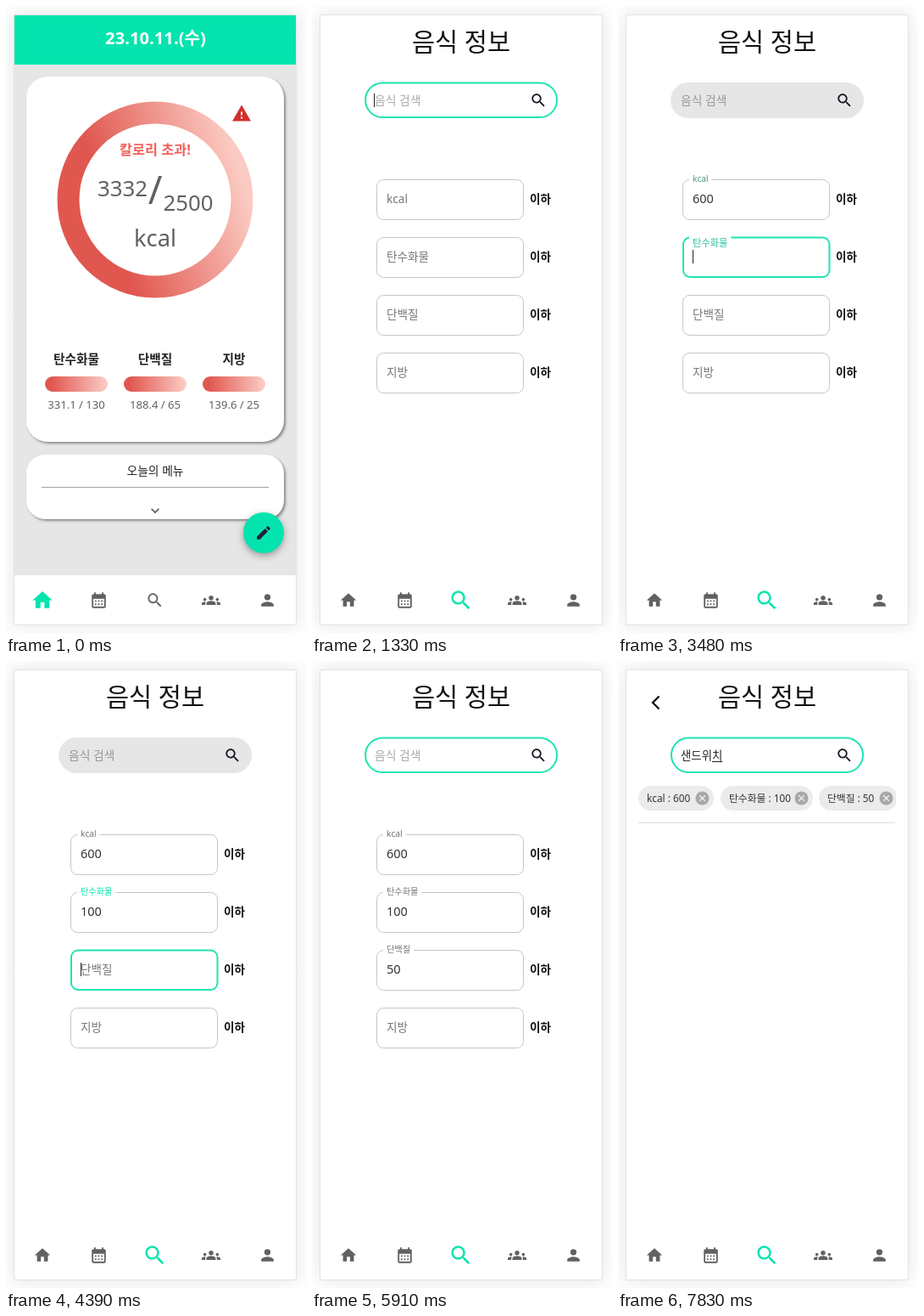
Recreate the animation shown at these times as an HTML page with a canvas. Size 354 by 738 pixels, loop 8 s.

```html
<!DOCTYPE html>
<html lang="ko">
<head>
<meta charset="utf-8">
<title>음식 정보</title>
<style>
  html, body { margin: 0; width: 100%; height: 100%; overflow: hidden; background: #fff; }
  canvas { display: block; width: 354px; height: 738px; }
</style>
</head>
<body>
<canvas id="stage"></canvas>
<script>
const W = 354, H = 738, LOOP = 8000;
const FONT = '"Noto Sans", "Noto Sans CJK KR", sans-serif';
const GREEN = [4, 228, 174], GREY = [97, 97, 97], LABEL = [118, 118, 118];

const canvas = document.getElementById('stage');
const ctx = canvas.getContext('2d');
const dpr = window.devicePixelRatio || 1;
canvas.width = W * dpr;
canvas.height = H * dpr;

const ICONS = {
  home: 'M10 20v-6h4v6h5v-8h3L12 3 2 12h3v8z',
  calendar: 'M19 4h-1V2h-2v2H8V2H6v2H5c-1.11 0-1.99.9-1.99 2L3 20c0 1.1.89 2 2 2h14c1.1 0 2-.9 2-2V6c0-1.1-.9-2-2-2zm0 16H5V10h14v10zM9 14H7v-2h2v2zm4 0h-2v-2h2v2zm4 0h-2v-2h2v2zm-8 4H7v-2h2v2zm4 0h-2v-2h2v2zm4 0h-2v-2h2v2z',
  search: 'M15.5 14h-.79l-.28-.27C15.41 12.59 16 11.11 16 9.5 16 5.91 13.09 3 9.5 3S3 5.91 3 9.5 5.91 16 9.5 16c1.61 0 3.09-.59 4.23-1.57l.27.28v.79l5 4.99L20.49 19l-4.99-5zm-6 0C7.01 14 5 11.99 5 9.5S7.01 5 9.5 5 14 7.01 14 9.5 11.99 14 9.5 14z',
  groups: 'M12 12.75c1.63 0 3.07.39 4.24.9 1.08.48 1.76 1.56 1.76 2.73V18H6v-1.61c0-1.18.68-2.26 1.76-2.73 1.17-.52 2.61-.91 4.24-.91zM4 13a2 2 0 1 0 0-4 2 2 0 0 0 0 4zm1.13 1.1C3.7 13.9 2.4 14.1 1.22 14.58.48 14.9 0 15.62 0 16.43V18h4.5v-1.61c0-.83.23-1.61.63-2.29zM20 13a2 2 0 1 0 0-4 2 2 0 0 0 0 4zm4 3.43c0-.81-.48-1.53-1.22-1.85-1.2-.5-2.5-.7-3.91-.48.4.68.63 1.46.63 2.29V18H24zM12 6a3 3 0 1 1 0 6 3 3 0 0 1 0-6z',
  person: 'M12 12a4 4 0 1 0 0-8 4 4 0 0 0 0 8zm0 2c-2.67 0-8 1.34-8 4v2h16v-2c0-2.66-5.33-4-8-4z',
  pencil: 'M3 17.25V21h3.75L17.81 9.94l-3.75-3.75L3 17.25zM20.71 7.04c.39-.39.39-1.02 0-1.41l-2.34-2.34c-.39-.39-1.02-.39-1.41 0l-1.83 1.83 3.75 3.75 1.83-1.83z',
  warning: 'M1 21h22L12 2 1 21zm12-3h-2v-2h2v2zm0-4h-2v-4h2v4z',
  more: 'M16.59 8.59L12 13.17 7.41 8.59 6 10l6 6 6-6z'
};
for (const k in ICONS) ICONS[k] = new Path2D(ICONS[k]);

const FIELDS = [
  { label: 'kcal', from: 1930, to: 3410, keys: [[2830, '6'], [2980, '60'], [3140, '600']] },
  { label: '탄수화물', from: 3410, to: 4390, keys: [[3680, '1'], [3910, '10'], [4140, '100']] },
  { label: '단백질', from: 4390, to: 5410, keys: [[4650, '5'], [4760, '50']] },
  { label: '지방', from: Infinity, to: Infinity, keys: [] }
];
const QUERY = [
  [6240, 'ㅅ'], [6360, '새'], [6480, '샌'], [6650, '샌ㄷ'], [6750, '샌드'],
  [6860, '샌등'], [6960, '샌드우'], [7060, '샌드위'], [7200, '샌드윛'], [7320, '샌드위치']
];
// Every focus or key press restarts the caret blink.
const TOUCHES = [1330, 5410, ...QUERY.map(k => k[0]),
  ...FIELDS.flatMap(f => [f.from, ...f.keys.map(k => k[0])])];

const clamp = v => Math.min(1, Math.max(0, v));
const mix = (a, b, p) => a + (b - a) * p;
const rgb = c => `rgb(${c.map(Math.round).join()})`;
const blend = (a, b, p) => rgb(a.map((v, i) => mix(v, b[i], p)));
const typed = (keys, t) => keys.reduce((s, [at, text]) => t >= at ? text : s, '');
const ease = p => 1 - (1 - p) ** 3;
const settle = (t, from) => t < from ? 0 : ease(clamp(Math.floor((t - from) / 65) * 65 / 200));

function caretOn(t) {
  const last = Math.max(0, ...TOUCHES.filter(e => e <= t));
  return (t - last) % 1000 < 500;
}

function text(s, x, cy, size, color, { weight = 400, align = 'left' } = {}) {
  ctx.font = `${weight} ${size}px ${FONT}`;
  ctx.textAlign = align;
  ctx.fillStyle = color;
  ctx.fillText(s, x, cy + size * .37);
  return ctx.measureText(s).width;
}

function box(x, y, w, h, r, fill, stroke, line = 1) {
  ctx.beginPath();
  ctx.roundRect(x, y, w, h, r);
  if (fill) { ctx.fillStyle = fill; ctx.fill(); }
  if (stroke) { ctx.strokeStyle = stroke; ctx.lineWidth = line; ctx.stroke(); }
}

function disc(x, y, r, fill) {
  ctx.beginPath();
  ctx.arc(x, y, r, 0, Math.PI * 2);
  ctx.fillStyle = fill;
  ctx.fill();
}

function lines(points, color, width) {
  ctx.beginPath();
  points.forEach(([x, y], i) => i ? ctx.lineTo(x, y) : ctx.moveTo(x, y));
  ctx.strokeStyle = color;
  ctx.lineWidth = width;
  ctx.stroke();
}

function icon(name, cx, cy, size, color) {
  ctx.save();
  ctx.translate(cx - size / 2, cy - size / 2);
  ctx.scale(size / 24, size / 24);
  ctx.fillStyle = color;
  ctx.fill(ICONS[name], 'evenodd');
  ctx.restore();
}

function shadowed(color, blur, dx, dy, draw) {
  ctx.save();
  ctx.shadowColor = color;
  ctx.shadowBlur = blur * dpr;
  ctx.shadowOffsetX = dx * dpr;
  ctx.shadowOffsetY = dy * dpr;
  draw();
  ctx.restore();
}

function redGradient(x0, y0, x1, y1) {
  const g = ctx.createLinearGradient(x0, y0, x1, y1);
  g.addColorStop(0, '#e0574f');
  g.addColorStop(1, '#fbcbc3');
  return g;
}

function caret(x, cy) {
  ctx.fillStyle = '#222';
  ctx.fillRect(Math.round(x), cy - 8, 1, 16);
}

function drawHome() {
  const mid = { align: 'center' }, bold = { align: 'center', weight: 600 };
  ctx.fillStyle = '#e6e6e6';
  ctx.fillRect(10, 11, 332, 659);
  ctx.fillStyle = rgb(GREEN);
  ctx.fillRect(10, 11, 332, 58);
  text('23.10.11.(수)', 176.5, 38, 20.2, '#fff', bold);

  shadowed('rgba(0,0,0,.4)', 3, 2, 2, () => {
    box(24, 83, 304, 430, 25, '#fff');
    box(24, 528, 304, 76, 22, '#fff');
  });

  ctx.beginPath();
  ctx.arc(176, 228, 102.5, 0, Math.PI * 2);
  ctx.strokeStyle = redGradient(120, 240, 275, 190);
  ctx.lineWidth = 26;
  ctx.stroke();
  icon('warning', 278, 126.5, 24, '#d32f2f');
  text('칼로리 초과!', 176, 169, 16.3, '#f4605a', bold);
  text('3332', 137.5, 214, 25.8, '#616161', mid);
  text('/', 176, 216, 45, '#616161', { align: 'center', weight: 300 });
  text('2500', 215, 231, 25.8, '#616161', mid);
  text('kcal', 176, 273, 27.3, '#616161', mid);

  [['탄수화물', '331.1 / 130'], ['단백질', '188.4 / 65'], ['지방', '139.6 / 25']].forEach(([name, sum], i) => {
    const x = 83 + 93 * i;
    text(name, x, 416, 14.7, '#222', bold);
    box(x - 37, 436, 74, 18, 9, redGradient(x - 30, 0, x + 35, 0));
    text(sum, x, 469, 13.1, '#616161', mid);
  });

  text('오늘의 메뉴', 176, 547, 13.8, '#222', mid);
  ctx.fillStyle = '#a0a0a0';
  ctx.fillRect(42, 566, 268, 1);
  icon('more', 176, 594, 20, '#555');
}

function drawSearchBar(t) {
  const focused = (t >= 1330 && t < 1930) || t >= 5410;
  const query = typed(QUERY, t);
  if (focused) box(63, 90.5, 226, 40.5, 20.2, '#fff', '#1de4b2', 2);
  else box(62, 90, 228, 42, 21, '#e6e6e6');
  icon('search', 267.2, 111, 21, '#15151f');
  if (!query) {
    text('음식 검색', 74, 111, 13.8, focused ? '#a9a9a9' : '#979797');
    if (focused && caretOn(t)) caret(73, 111);
    return;
  }
  const end = 74 + text(query, 74, 111, 13.4, '#222');
  const start = 74 + ctx.measureText(query.slice(0, -1)).width;
  ctx.fillStyle = '#222';
  ctx.fillRect(start, 118, end - start, 1);
  if (caretOn(t)) caret(end, 111);
}

function drawField(f, i, t) {
  const y = 204.5 + 68 * i, cy = y + 22;
  const focused = t >= f.from && t < f.to;
  const up = settle(t, f.from);
  const tint = up * (1 - settle(t, f.to));
  if (focused) box(77, y, 172.5, 46.5, 8, null, '#1de4b2', 2);
  else box(76.5, y, 173, 47, 8, null, '#c6c6c6');

  const size = mix(13.6, 10.2, up);
  ctx.font = `400 ${size}px ${FONT}`;
  if (up > .3) {
    ctx.fillStyle = '#fff';
    ctx.fillRect(84, y - 2, ctx.measureText(f.label).width + 8, 4);
  }
  text(f.label, 88, mix(cy, y - 1, up), size, blend(LABEL, GREEN, tint));

  const value = typed(f.keys, t);
  const w = text(value, 88, cy, 14.5, '#333');
  if (focused && caretOn(t)) caret(88 + w, cy + .5);
  text('이하', 257, cy + .5, 13.6, '#111', { weight: 600 });
}

function drawResults() {
  lines([[48.5, 41.5], [41, 49], [48.5, 56.5]], '#111', 2.3);
  ctx.save();
  ctx.beginPath();
  ctx.rect(24, 140, 304, 45);
  ctx.clip();
  [['kcal : 600', 24, 89], ['탄수화물 : 100', 121, 109], ['단백질 : 50', 237, 93]].forEach(([s, x, w]) => {
    const cx = x + w - 13.5, cy = 161.5;
    box(x, 147, w, 29, 14.5, '#ebebeb');
    text(s, x + 10, 162, 11.8, '#333');
    disc(cx, cy, 8, '#a8a8a8');
    lines([[cx - 3.3, cy - 3.3], [cx + 3.3, cy + 3.3]], '#ebebeb', 1.5);
    lines([[cx + 3.3, cy - 3.3], [cx - 3.3, cy + 3.3]], '#ebebeb', 1.5);
  });
  ctx.restore();
  ctx.fillStyle = '#dedede';
  ctx.fillRect(24, 190, 303, 1);
}

function drawNav(t) {
  const p = clamp(Math.floor((t - 860) / 65) * 65 / 130);
  const y = 699.5;
  ctx.fillStyle = '#fff';
  ctx.fillRect(10, 670, 332, 58);
  icon('home', 43, y, t < 860 ? 28 : 22, blend(GREEN, GREY, p));
  icon('calendar', 109.5, y, 22, rgb(GREY));
  icon('search', 175.7, y, mix(22, 30, clamp((t - 800) / 120)), blend(GREY, GREEN, p));
  icon('groups', 242, y, 22, rgb(GREY));
  icon('person', 308.5, y, 22, rgb(GREY));
}

function drawPointer() {
  disc(187, 688, 14.5, 'rgba(0,0,0,.11)');
  box(10, 706, 109, 22, [0, 4, 0, 0], '#dee1e6');
  text('j9a403.p.ssafy.io...', 15, 717.5, 11.2, '#3c4043');
}

function draw(t) {
  ctx.setTransform(dpr, 0, 0, dpr, 0, 0);
  ctx.fillStyle = '#fff';
  ctx.fillRect(0, 0, W, H);
  shadowed('rgba(0,0,0,.1)', 20, 0, 0, () => box(9, 10, 334, 719, 0, '#fff'));

  const home = t < 860;
  if (home) {
    drawHome();
  } else {
    text('음식 정보', 176, 42.5, 29.5, '#111', { align: 'center', weight: 500 });
    drawSearchBar(t);
    if (t < 6240) FIELDS.forEach((f, i) => drawField(f, i, t));
    else drawResults();
  }
  drawNav(t);
  if (home) {
    shadowed('rgba(0,0,0,.35)', 8, 0, 3, () => disc(304, 620, 24, rgb(GREEN)));
    icon('pencil', 304, 620, 21, '#20203a');
  }
  if (t >= 800 && t < 990) drawPointer();
  box(9.5, 10.5, 333, 718, 0, null, '#e2e2e2');
}

const begin = performance.now();
function tick() {
  draw((performance.now() - begin) % LOOP);
  requestAnimationFrame(tick);
}
tick();
</script>
</body>
</html>
```
